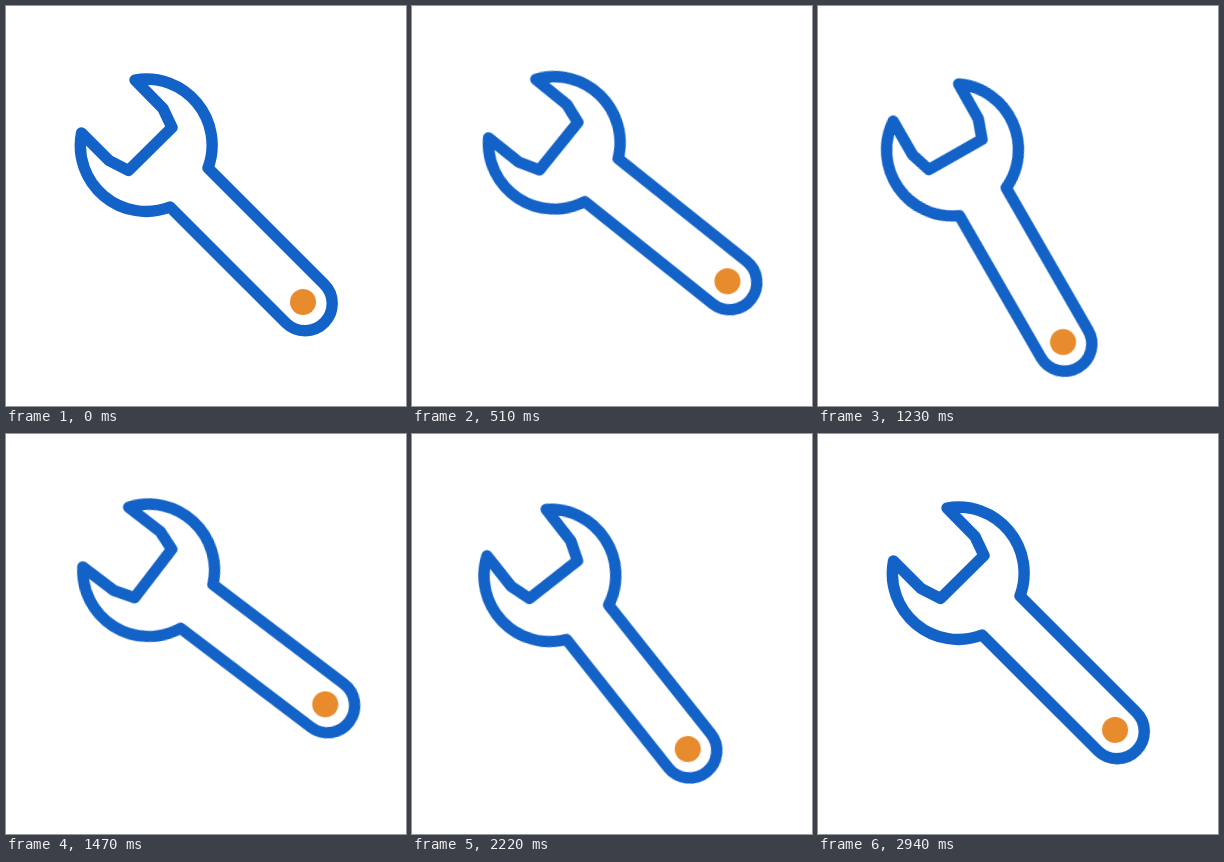
Animation, 400 px wide and 400 px high, one loop 2.97 s. Source, as an HTML page without scripts:

```html
<!DOCTYPE html>
<html lang="en">
<head>
<meta charset="utf-8">
<title>Wrench</title>
<style>
  html, body {
    margin: 0;
    width: 100%;
    height: 100%;
    overflow: hidden;
    background: #fff;
  }
  svg {
    display: block;
    width: 100%;
    height: 100%;
  }
  .wrench {
    transform-origin: 120px 120px;
    animation: turn 2970ms infinite;
  }
  .body {
    fill: none;
    stroke: #1362c7;
    stroke-width: 11.4;
    stroke-linejoin: round;
  }
  .hole { fill: #e88b2d; }

  /* Three pulls, then settle back to rest */
  @keyframes turn {
    0%     { transform: rotate(0deg);   animation-timing-function: cubic-bezier(.4, 0, .44, 1); }
    6.03%  { transform: rotate(22deg);  animation-timing-function: cubic-bezier(.375, 0, .21, 1); }
    24.18% { transform: rotate(-10deg); animation-timing-function: cubic-bezier(.81, 0, .44, 1); }
    37.34% { transform: rotate(22deg);  animation-timing-function: cubic-bezier(.375, 0, .21, 1); }
    55.05% { transform: rotate(-10deg); animation-timing-function: cubic-bezier(.81, 0, .44, 1); }
    69.12% { transform: rotate(22deg);  animation-timing-function: cubic-bezier(.43, 0, .47, 1); }
    81.6%  { transform: rotate(-10deg); animation-timing-function: cubic-bezier(.3, 0, .34, 1); }
    100%   { transform: rotate(0deg); }
  }
</style>
</head>
<body>
<svg viewBox="0 0 400 400">
  <g class="wrench">
    <path class="body" d="M129 74 A66 66 0 0 1 202 162 L318 278 A27 27 0 0 1 280 317 L164 201 A66 66 0 0 1 75.5 127 L103 154.5 L122.5 164.5 L166 121.5 L157 102.5 Z"/>
    <circle class="hole" cx="297" cy="296" r="13"/>
  </g>
</svg>
</body>
</html>
```
